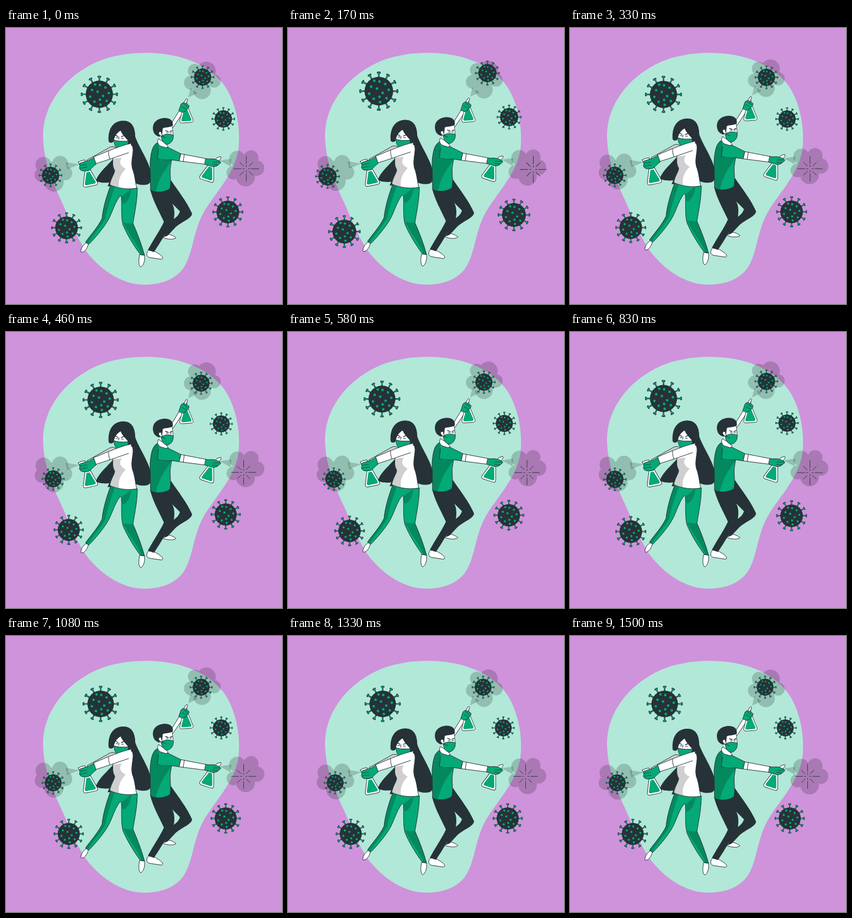
An HTML page with a canvas for the animation above (1540 ms loop, 500 by 500 pixels).

```html
<!DOCTYPE html>
<html lang="en">
<head>
<meta charset="utf-8">
<title>Spraying viruses</title>
<style>
html, body { margin: 0; width: 100%; height: 100%; overflow: hidden; background: #ce93db; }
canvas { display: block; width: 500px; height: 500px; }
</style>
</head>
<body>
<canvas id="stage" width="500" height="500"></canvas>
<script>
const ctx = document.getElementById('stage').getContext('2d');
const LOOP = 1540, CYCLE = 1500, FRAME = 1000 / 24;
const DARK = '#263238', GREEN = '#03a977', SHADE = '#04895f', WHITE = '#fff', GREY = '#cfcfcf';
const MINT = '#b2e8d8', PURPLE = '#ce93db', MIST = 'rgba(0,0,0,.18)';

function shape(d, fill, line = DARK, width = 1) {
  const path = new Path2D(d);
  if (fill) { ctx.fillStyle = fill; ctx.fill(path); }
  if (line) { ctx.strokeStyle = line; ctx.lineWidth = width; ctx.stroke(path); }
}
const flat = (d, fill) => shape(d, fill, null);
const line = (d, width = 1, color = DARK) => shape(d, null, color, width);

// a filled outline with shading clipped to it
function shaded(d, fill, shadow, ...patches) {
  flat(d, fill);
  ctx.save();
  ctx.clip(new Path2D(d));
  for (const patch of patches) flat(patch, shadow);
  ctx.restore();
  line(d);
}

function placed(x, y, scale, angle, draw) {
  ctx.save();
  ctx.translate(x, y);
  ctx.rotate(angle);
  ctx.scale(scale, scale);
  draw();
  ctx.restore();
}

function disc(x, y, r, fill) {
  ctx.fillStyle = fill;
  ctx.beginPath();
  ctx.arc(x, y, r, 0, Math.PI * 2);
  ctx.fill();
}

const blob = 'M253 45C308 45 362 61 394 102C416 132 426 180 421 220C414 268 372 305 354 342C338 376 338 412 320 437C302 460 272 465 250 465C205 465 165 432 142 400C123 370 111 335 94 300C78 262 67 232 67 192C69 138 104 92 157 65C187 50 223 45 253 45Z';

// x, y, body radius
const viruses = [[171.5, 123, 24], [353.5, 92.8, 15.2], [390, 166.5, 15.2],
  [85.5, 266, 15.2], [113.7, 358.4, 20], [398, 330.5, 20]];
const spots = [[-.35, -.8], [.05, -.75], [.5, -.55], [-.6, -.35], [-.14, -.2], [.3, .14],
  [.77, -.1], [-.75, .2], [-.4, .6], [.05, .45], [.6, .55], [.1, .85]];

function virus([x, y, r]) {
  placed(x, y, r / 24, 0, () => {
    for (let i = 0; i < 12; i++) {
      placed(0, 0, 1, i * Math.PI / 6, () => {
        line('M0 -22V-30', 2.6);
        line('M-1.6 -31H1.6', 3.4);
        line('M0 -25V-30M-1.6 -31H1.6', 1.3, GREEN);
      });
    }
    disc(0, 0, 24, DARK);
    for (const [u, v] of spots) disc(u * 21.5, v * 21.5, 2.3, GREEN);
  });
}

function burst() {
  ctx.save();
  ctx.translate(430.5, 254.3);
  for (let i = 0; i < 8; i++) {
    line(i % 2 ? 'M7 0H16' : 'M3.5 0H6M9 0H22', .9);
    ctx.rotate(Math.PI / 4);
  }
  ctx.restore();
}

function cloud(lobes, jet) {
  const path = new Path2D();
  for (const [x, y, r] of lobes) {
    path.moveTo(x + r, y);
    path.arc(x, y, r, 0, Math.PI * 2);
  }
  ctx.fillStyle = MIST;
  ctx.fill(path);
  flat(jet, MIST);
}

function clouds() {
  cloud([[342, 77.5, 12.5], [363, 78, 17], [377, 96, 12], [355, 113, 16], [335, 99, 12.7], [355, 94, 15]],
    'M330 126L334 109L347 118Z');
  cloud([[419, 237, 14.5], [444, 235, 13.5], [454, 254, 14], [434, 270, 17], [412, 262, 12.5], [432, 252, 16]],
    'M387 240L408 237L407 251Z');
  cloud([[68, 248, 14.5], [98, 246, 14.5], [107, 263, 13], [87, 279, 17.5], [65, 266, 13], [85, 260, 18]],
    'M133 247L108 243L111 256Z');
}

function bottle(x, y, angle, scale = 1) {
  placed(x, y, scale, angle, () => {
    shape('M-5 0H5L13 24Q14 29 9 29H-9Q-14 29 -13 24Z', WHITE);
    flat('M-3 3H3L10 23Q10 26 8 26H-8Q-10 26 -10 23Z', GREEN);
    shape('M-3.5 0V-11H3.5V0Z', WHITE);
  });
}

function woman() {
  // hair behind the body
  flat('M211 168C228 167 234 180 234 196C238 210 254 234 260 252C266 270 264 284 253 284C243 285 235 283 229 277L203 286L184 287L187 280C178 281 168 280 163 277C166 264 182 251 197 234L203 210Z', DARK);

  // far arm
  shape('M202 219C196 213 190 214 183 219C172 225 158 233 147 239L154 249C170 241 188 232 202 226Z', GREY);
  line('M155 241L185 226', .8);

  // legs and shoes
  shape('M146 389C138 393 135 402 136 406C141 408 148 399 149 392Z', WHITE);
  shape('M242 411C240 420 240 431 244 433C250 430 252 420 251 412Z', WHITE);
  shaded('M190 284C182 305 176 325 174 345C167 360 154 374 144 388L150 392C162 380 175 364 182 353C192 338 195 320 206 305Q208 303 209 306C210 322 208 343 212 357C220 376 232 395 243 410L251 412C246 393 238 372 230 354C233 335 238 312 238 290C224 292 205 291 190 284Z',
    GREEN, SHADE,
    'M188 284L197 288C190 308 183 328 180 345C172 360 158 374 148 391L142 388L172 346Z',
    'M212 352C222 356 229 352 231 355L252 412L246 412C239 392 222 374 212 352Z',
    'M227 291C226 304 221 315 212 319L207 307Z');

  // top
  shaded('M203 220C212 211 223 207 229 214C233 224 225 240 229 255C234 268 234 280 237 290C222 293 203 291 188 284C190 272 197 264 197 258C191 248 195 240 193 235Z',
    WHITE, GREY,
    'M190 237L210 235C205 242 205 249 217 255C207 265 202 277 205 292L184 289Z');

  // face, mask and fringe
  flat('M194 206C192 195 198 189 207 185C212 192 218 196 222 202L220 212L206 219Z', WHITE);
  shape('M196 203C204 206 213 205 222 205C222 213 214 219 207 220C199 218 195 211 196 203Z', GREEN);
  flat('M186 206C184 184 193 169 211 168C228 168 235 182 234 202L232 215C226 214 223 209 220 203C215 197 209 191 208 186C201 189 196 197 195 206Q190 210 186 206Z', DARK);
  line('M198 194L203 197M209 197L214 195', 1.4);
  line('M199 199H203M209 200H213M205 198L204 202');
  line('M221 205L226 202M220 215L225 211', .8);

  // spray bottle and near arm
  bottle(148, 258, -.2);
  shape('M131 243Q135 240 143 239L144 244L134 247Q131 246 131 243Z', WHITE);
  shape('M227 209C207 213 185 223 158 234L162 246C182 240 204 232 222 226', WHITE);
  line('M186 223Q185 228 188 237');
  shape('M159 235C154 237 150 241 146 241L134 245Q131 247 134 249L133 254Q134 258 139 259L148 259C154 257 157 251 163 247Z', GREEN);
  line('M134 249L146 247M135 254L147 252', .8);
}

function man() {
  // raised arm
  shape('M294 182L315 148L321 153L302 181Z', WHITE);
  bottle(325.3, 145, -.07, .92);
  shape('M320 139L326 129Q329 127 329 130L325 140Z', WHITE);
  shape('M313 150L317 138Q320 134 324 136L329 139Q333 140 331 144L327 149L321 153Z', GREEN);
  line('M322 138L329 143M319 143L327 147', .8);

  // legs and shoes
  shape('M288 374C295 373 302 375 308 380C304 384 292 383 285 380Z', WHITE);
  shape('M258 403C253 408 254 415 261 416L281 419C288 418 282 411 268 404Z', WHITE);
  ctx.fillStyle = DARK;
  ctx.fill(new Path2D('M261 292L299 276C311 294 328 315 337 336C337 345 318 351 307 361L293 376L286 379L289 372C281 386 274 397 268 406L257 402C268 382 280 365 286 351C278 333 266 313 261 292ZM301 318C305 325 306 335 304 346C310 342 314 337 315 332Z'), 'evenodd');

  // shirt
  shape('M276 207L290 207L292 217L278 215Z', WHITE);
  shaded('M276 207C266 211 263 222 261 244L262 294C272 299 288 298 297 291C300 279 296 263 298 251L300 239L314 241L317 228L293 216C287 217 280 213 276 207Z',
    GREEN, SHADE,
    'M274 206C279 219 276 228 275 237C284 243 293 239 301 238L285 262C279 272 274 285 271 299L259 297V220Z');
  line('M275 237C284 240 292 239 300 239M276 219L274 237', .8);
  shape('M276 201C273 206 275 211 280 214L290 217L294 215L288 208Z', WHITE);

  // head
  flat('M280 180L301 173L303 196L291 208L280 202Z', WHITE);
  line('M301 176L303 195', .8);
  shape('M281 196C289 191 296 192 303 194C304 203 299 210 291 211C284 208 282 203 281 196Z', GREEN);
  flat('M267 187C263 172 274 163 288 163C297 163 304 168 302 177C296 181 288 179 284 182L283 192L278 197C271 195 268 191 267 187Z', DARK);
  shape('M281 188C277 187 275 190 278 194L283 197Z', WHITE);
  line('M289 186L294 188M297 188L301 186', 1.4);
  line('M290 190H294M297 190H300M282 196L289 199', .9);

  // front arm and spray bottle
  bottle(371.5, 249, .32);
  shape('M378 240L382 235L389 233Q391 235 388 238L384 242Z', WHITE);
  shape('M317 228L364 237L361 247L314 241Z', WHITE);
  line('M323 229L321 242');
  shape('M362 237C369 238 374 236 380 238L387 241Q391 244 387 246L382 250Q376 253 370 250L360 247Z', GREEN);
  line('M375 243L387 243M374 247L384 248', .8);
}

// two quick beats, then a rest
const beats = [[0, 1], [.1, 1.1], [.3, 1], [.4, 1], [.5, 1.088], [.615, 1], [1, 1]];
function pulse(p) {
  const i = Math.max(1, beats.findIndex(([at]) => at >= p));
  const [a, from] = beats[i - 1], [b, to] = beats[i];
  return from + (to - from) * (p - a) / (b - a);
}

function render(time) {
  const step = Math.floor((time % LOOP + 4.9) / FRAME);
  const p = Math.min(1, (step + 1) * FRAME / CYCLE);
  const lift = -4 * (1 - Math.cos(p * Math.PI * 2));
  const zoom = pulse(p);

  ctx.fillStyle = PURPLE;
  ctx.fillRect(0, 0, 500, 500);
  flat(blob, MINT);

  ctx.save();
  ctx.translate(0, lift);
  clouds();
  ctx.restore();

  ctx.save();
  ctx.translate(258, 230);
  ctx.scale(zoom, zoom);
  ctx.translate(-258, -230);
  viruses.forEach(virus);
  burst();
  ctx.restore();

  ctx.save();
  ctx.translate(0, lift);
  woman();
  man();
  ctx.restore();
}

ctx.lineJoin = ctx.lineCap = 'round';
const start = performance.now();
function tick() {
  render(performance.now() - start);
  requestAnimationFrame(tick);
}
tick();
</script>
</body>
</html>
```
